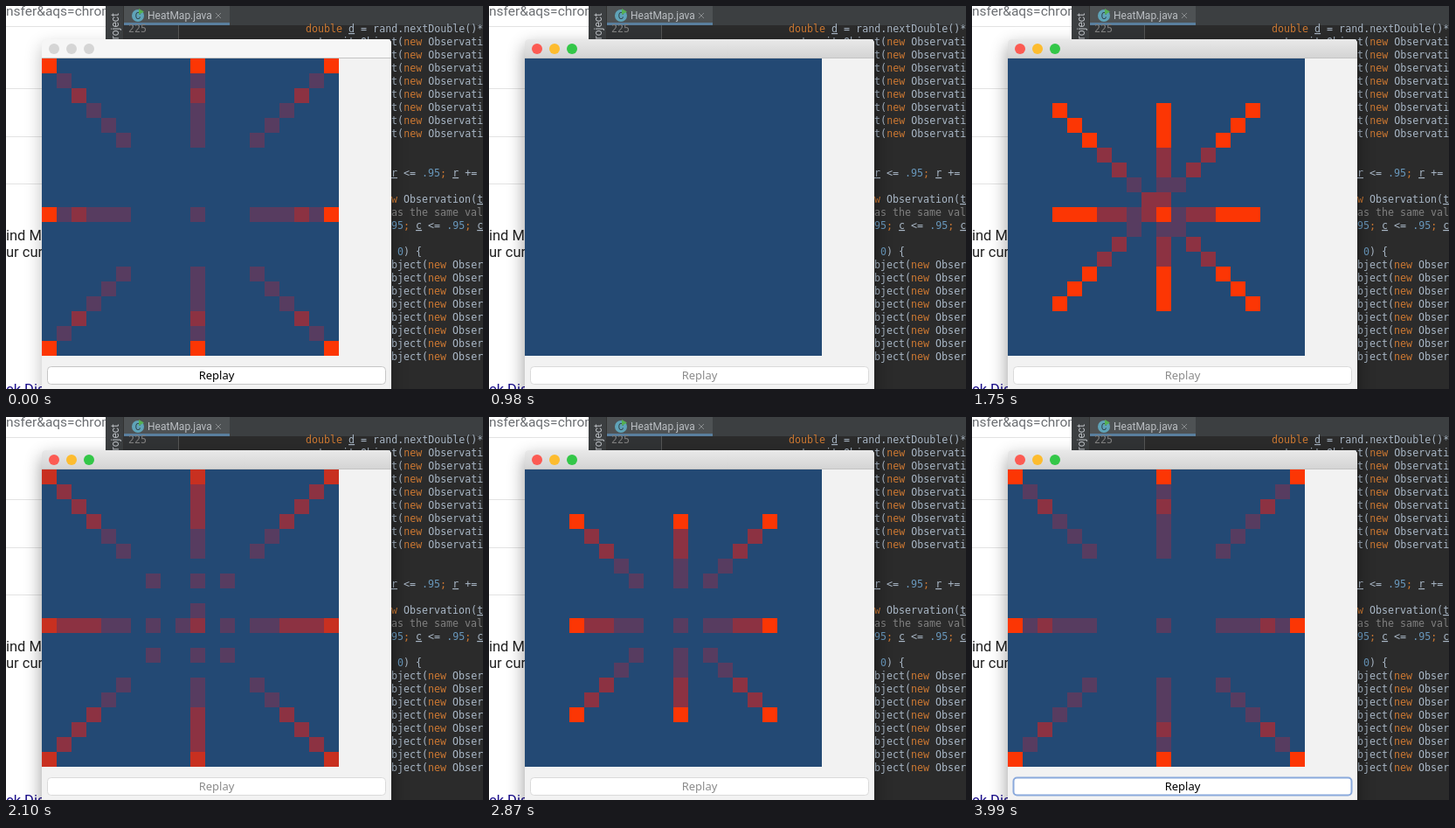
Recreate the animation shown at these times as an HTML page with a canvas. Size 546x438 px, loop 4060 ms.

```html
<!DOCTYPE html>
<html lang="en">
<head>
<meta charset="utf-8">
<title>Heat map replay</title>
<style>
html, body { margin: 0; width: 100%; height: 100%; overflow: hidden; background: #fff; }
svg, canvas { position: absolute; left: 0; top: 0; display: block; }
canvas { left: 41px; top: 60px; }
text { white-space: pre; }
.page { font: 16.5px Roboto, sans-serif; fill: #222; }
.ui { font: 12px Roboto, sans-serif; fill: #bbbfc3; }
.code text { font: 11.65px "DejaVu Sans Mono", monospace; fill: #a9b7c6; }
.code .k { fill: #cc7832; }
.code .n { fill: #6897bb; }
.code .c { fill: #808080; }
.code .u { text-decoration: underline; }
#label { font: 500 13px "Noto Sans", sans-serif; text-anchor: middle; }
</style>
</head>
<body>
<svg width="546" height="438" viewBox="0 0 546 438">
  <defs>
    <linearGradient id="bar" x2="0" y2="1">
      <stop stop-color="#e9e9e9"/><stop offset="1" stop-color="#d3d3d3"/>
    </linearGradient>
    <linearGradient id="blue" x2="0" y2="1">
      <stop stop-color="#6ba5f8"/><stop offset="1" stop-color="#2461ea"/>
    </linearGradient>
    <filter id="blur" x="-20%" y="-20%" width="140%" height="140%">
      <feGaussianBlur stdDeviation="10"/>
    </filter>
  </defs>

  <!-- browser page -->
  <rect width="114" height="438" fill="#fff"/>
  <path d="M0 23.5H114M0 94.5H41M0 149.5H41M0 203.5H41" stroke="#e3e3e3"/>
  <g class="page">
    <text x="0" y="11" fill="#666" style="font-size:15.5px;fill:#6b6e72">nsfer&amp;aqs=chrom</text>
    <text x="0" y="268">ind My</text>
    <text x="0" y="287">ur curr</text>
    <text x="0" y="444" style="fill:#1a0d8b">ck Dis</text>
  </g>

  <!-- editor -->
  <rect x="114" width="432" height="438" fill="#2b2b2b"/>
  <rect x="134" y="22" width="63" height="16" fill="#313335"/>
  <path d="M197.5 22V38" stroke="#555"/>
  <rect x="114" width="432" height="22" fill="#3c3f41"/>
  <rect x="114" width="20" height="60" fill="#3c3f41"/>
  <rect x="135" width="121" height="22" fill="#4e5254"/>
  <rect x="135" y="19" width="121" height="3" fill="#5a7f9e"/>
  <path d="M134.5 0V38" stroke="#323232"/>
  <circle cx="151" cy="11" r="7" fill="#5fa3b8"/>
  <text x="151" y="15" text-anchor="middle" class="ui" style="font-size:10px;fill:#2b3b42">C</text>
  <path d="M152 3l6 3.500-6 3.500z" fill="#55b052"/>
  <text x="162" y="15" class="ui">HeatMap.java</text>
  <path d="M240 8l6 6m0-6l-6 6" stroke="#888b8d"/>
  <text transform="translate(129 8) rotate(-90)" text-anchor="end" class="ui">Project</text>
  <g class="code" id="code"></g>

  <!-- window -->
  <rect id="shade" x="41" y="46" width="400" height="410" filter="url(#blur)"/>
  <path d="M41 438V43q0-5 5-5H436q5 0 5 5V438z" fill="#f2f2f2"/>
  <path id="title" d="M41 60V43q0-5 5-5H436q5 0 5 5V60z"/>
  <path d="M41 59.500H441" stroke="#c4c4c4"/>
  <g id="lights">
    <circle cx="55" cy="49" r="6"/><circle cx="75" cy="49" r="6"/><circle cx="95" cy="49" r="6"/>
  </g>
  <rect id="button" x="47.500" y="412.500" width="387" height="20" rx="4"/>
  <text id="label" x="241" y="427">Replay</text>
</svg>
<canvas id="map" width="340" height="340"></canvas>
<script>
const $ = id => document.getElementById(id);
const set = (el, attrs) => { for (const k in attrs) el.setAttribute(k, attrs[k]); };

// Code lines: {k:...} style marks pick a colour class.
const paint = s => s.replace(/</g, '&lt;')
  .replace(/\{(\w):([^}]*)\}/g, '<tspan class="$1">$2</tspan>');
let lines = '';
const line = (x, y, s) => lines += `<text x="${x}" y="${y + 4}">${paint(s)}</text>`;
line(140, 26, '<tspan'.slice(0, 0) + '{c:225}');
line(343, 26, '{k:double} {u:d} = rand.nextDouble()*');
for (let i = 0; i < 8; i++) {
  line(343, 41 + 15 * i, 'out.writeObject({k:new} Observati');
  line(441, 296 + 15 * i, 'bject({k:new} Obser');
}
line(441, 191, '{u:r} <= {n:.95}{k:;} {u:r} +=');
line(441, 221, '{k:w} Observation({u:t}');
line(441, 236, '{c:as the same val}');
line(441, 251, '{n:95}{k:;} {u:c} <= {n:.95}{k:;} {u:c}');
line(441, 281, ' {n:0}) {');
$('code').innerHTML = lines;

const LOOP = 4060, PRESS = 560, START = 840, END = 3290, CELL = 17;
const heat = ['#234974', '#573c60', '#8c3242', '#c83020', '#fc3604'];

// Heat of rings 0 to 9, then of the doubled and the central cell.
const poses = [
  [START, '000000000000'],
  [1260, '044200000000'],
  [1750, '212244400024'],
  [2100, '001011222312'],
  [2870, '001122400001'],
  [END, '000011121401']
];
const waves = [860, 2020], RING_MS = 140;

function level(i, t) {
  if (t < START || t >= END) return +poses[5][1][i];
  const p = poses.findIndex(q => q[0] > t);
  const [t0, a] = poses[p - 1], [t1, b] = poses[p];
  const from = +a[i], to = +b[i], f = (t - t0) / (t1 - t0);
  const hit = i > 0 && i < 10 &&
    waves.map(w => w + RING_MS * i).find(h => h > t0 && h < t1);
  if (hit) return t < hit
    ? Math.round(from * Math.max(0, 1 - (t - t0) / 500))
    : Math.round(4 + (to - 4) * (t - hit) / (t1 - hit));
  return Math.round(from + (to - from) * (to > from ? f ** 3 : f));
}

const g = $('map').getContext('2d');
function cell(x, y, v) {
  g.fillStyle = heat[v];
  g.fillRect(x * CELL, y * CELL, CELL, CELL);
}

function drawMap(t) {
  g.fillStyle = heat[0];
  g.fillRect(0, 0, 340, 340);
  for (let i = 1; i < 10; i++) {
    const v = level(i, t), spots = [9 - i, 10, 10 + i];
    for (const x of spots) for (const y of spots)
      if (x !== 10 || y !== 10) cell(x, y, v);
  }
  const twice = level(10, t);
  cell(9, 9, level(0, t));
  cell(10, 9, twice);
  cell(9, 10, twice);
  cell(10, 10, level(11, t));
}

function drawWindow(t) {
  const active = t >= PRESS, down = active && t < START;
  const off = t >= START && t < END, focus = t >= END;
  set($('shade'), { opacity: active ? 0.4 : 0.25 });
  set($('title'), { fill: active ? 'url(#bar)' : '#f6f6f6' });
  ['#fc5b53', '#fdbc2f', '#33c748'].forEach((c, i) =>
    set($('lights').children[i], { fill: active ? c : '#d5d5d5' }));
  set($('button'), {
    fill: down ? 'url(#blue)' : '#fff',
    stroke: down ? '#2f66d8' : focus ? '#8aa9dc' : off ? '#dadada' : '#c6c6c6',
    'stroke-width': focus ? 2 : 1
  });
  set($('label'), { fill: off ? '#8c8c8c' : '#000' });
}

function frame(now) {
  const t = now % LOOP;
  drawWindow(t);
  drawMap(t);
  requestAnimationFrame(frame);
}
frame(performance.now());
</script>
</body>
</html>
```
